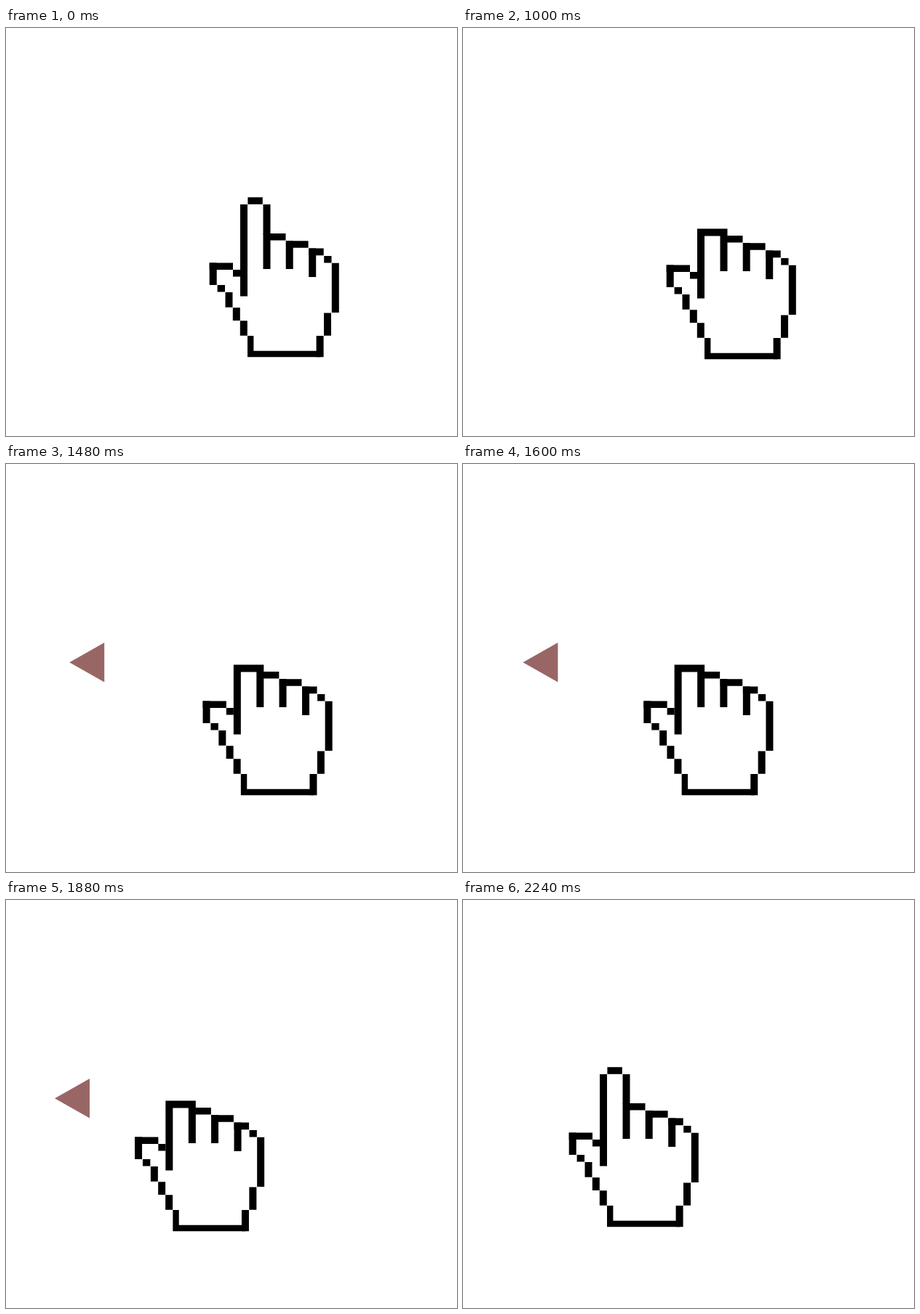
Write an HTML page without scripts that moves like this. It is 620 px wide and 562 px high and loops after 3480 ms.

```html
<!DOCTYPE html>
<html lang="en">
<head>
<meta charset="utf-8">
<title>Drag left</title>
<style>
  /* clock in ms, ticking every 40 */
  @property --t {
    syntax: "<number>";
    inherits: true;
    initial-value: 0;
  }
  @keyframes clock { from { --t: 0 } to { --t: 3480 } }

  html, body {
    margin: 0;
    width: 100%;
    height: 100%;
    overflow: hidden;
    background: #fff;
  }
  svg {
    display: block;
    width: 620px;
    height: 562px;
    animation: clock 3480ms steps(87) -1ms infinite;
    /* switches: 0 or 1 */
    --pressed: clamp(0, var(--t) - 980, 1);
    --held: clamp(0, 2220 - var(--t), 1);
    --down: calc(var(--pressed) * var(--held));
    /* eased drag progress */
    --phase: clamp(0, (var(--t) - 1348) / 784, 1);
    --drag: calc((1 - cos(var(--phase) * 180deg)) / 2);
  }
  .hand {
    transform: translate(calc(var(--drag) * -134px),
      calc(var(--down) * 3px - (1 - var(--held)) * 3px));
  }
  .hand path { fill: none; stroke: #000; stroke-width: 10 }
  .hand .h { stroke-width: 9.6 }
  .hand .base { stroke-width: 8.4 }
  .open { opacity: calc(1 - var(--down)) }
  .closed { opacity: var(--down) }
  .arrow {
    fill: #966;
    transform: translateX(calc(var(--drag) * -29px));
    opacity: calc(clamp(0, (var(--t) - 1280) / 200, 1) * var(--held));
  }
</style>
</head>
<body>
<svg viewBox="0 0 620 562">
  <path class="arrow" d="M89.2 273.3 137.2 246V300.5Z"/>
  <g class="hand">
    <!-- palm, thumb and curled fingers -->
    <path d="M327 283V369.5M358.5 283V332M389.7 293V332M421.2 303.5V343
      M452.8 323.8V392M442 392.5V423.7M431.6 424V453.2M326.8 403.3V423.7
      M316.8 385.2V403M306.5 364V384.7M284.7 323.4V354"/>
    <path class="h" d="M363 287.8H384.5M385 298H415.6M416.2 308.4H436.7
      M437.2 318.7H447.5M290.6 358.7H301M279.7 328.2H312M312 337.8H322"/>
    <path class="base" d="M336.2 424V449H432"/>
    <g class="open">
      <path d="M327 243V284M358.5 243V284"/>
      <path class="h" d="M332.4 238H352.8"/>
    </g>
    <path class="closed" d="M322 278.5H363.5"/>
  </g>
</svg>
</body>
</html>
```
